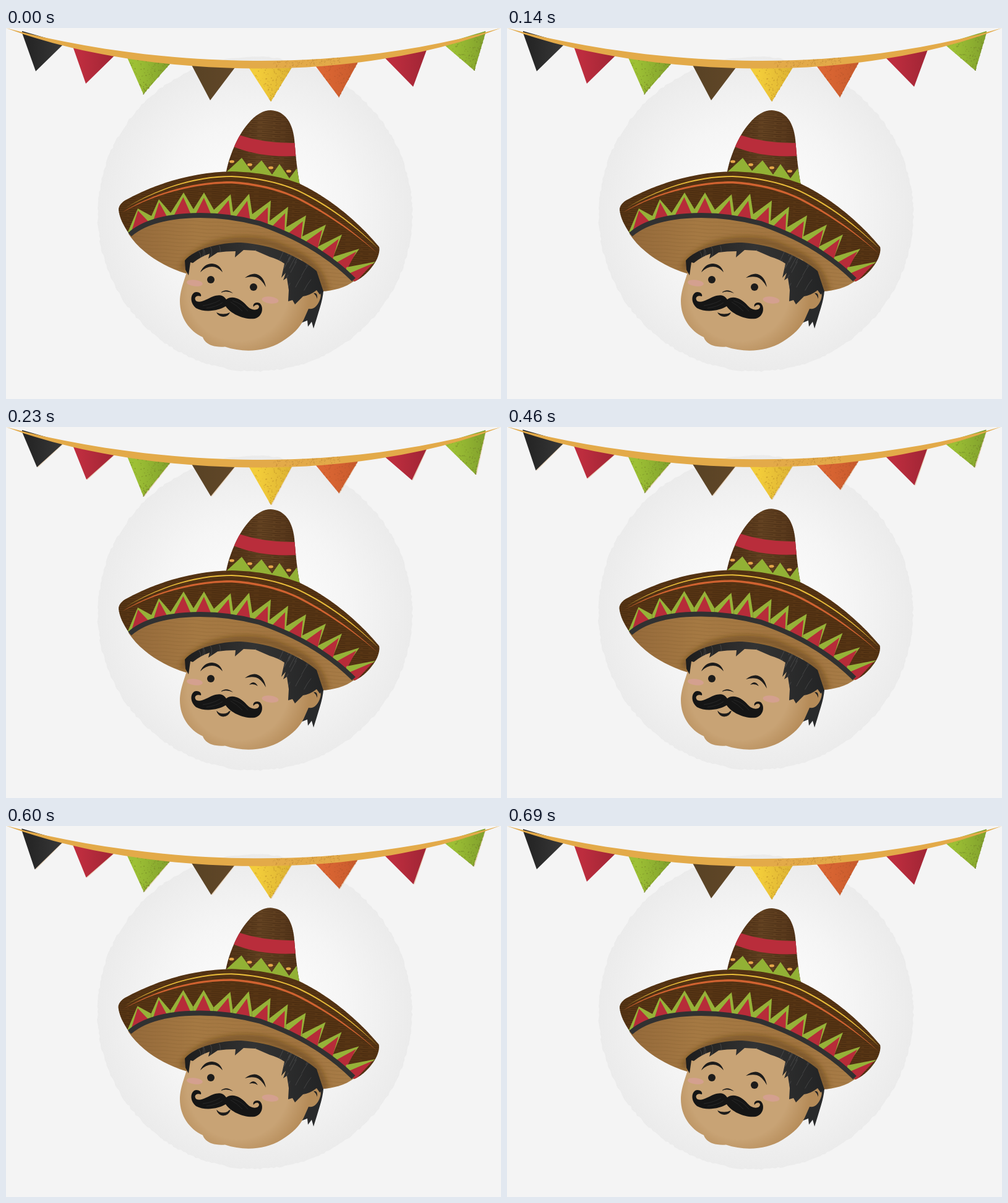
Recreate the animation shown at these times as an HTML page. Size 800 px wide and 600 px high, loop 920 ms.

```html
<!DOCTYPE html>
<html lang="en">
<head>
<meta charset="utf-8">
<title>Sombrero wink</title>
<style>
html, body { margin: 0; width: 100%; height: 100%; overflow: hidden; background: #f4f4f4; }
svg { display: block; width: 800px; height: 600px; }
</style>
</head>
<body>
<svg viewBox="0 0 800 600">
<defs>
  <radialGradient id="glow"><stop offset=".1" stop-color="#fdfdfd"/><stop offset=".6" stop-color="#f5f5f5"/><stop offset="1" stop-color="#ebebeb"/></radialGradient>
  <radialGradient id="skin" gradientUnits="userSpaceOnUse" cx="375" cy="425" r="116"><stop offset=".7" stop-color="#c8a375"/><stop offset="1" stop-color="#b58b58"/></radialGradient>
  <linearGradient id="under"><stop offset="0" stop-color="#94693a"/><stop offset=".3" stop-color="#a57943"/><stop offset=".75" stop-color="#a27540"/><stop offset="1" stop-color="#a87d48"/></linearGradient>
  <linearGradient id="crown"><stop offset="0" stop-color="#4f3015"/><stop offset=".5" stop-color="#644322"/><stop offset="1" stop-color="#523318"/></linearGradient>
  <linearGradient id="hair"><stop offset="0" stop-color="#1d1d1d"/><stop offset=".5" stop-color="#333"/><stop offset="1" stop-color="#232425"/></linearGradient>
  <pattern id="weave" width="38" height="7" patternUnits="userSpaceOnUse" patternTransform="rotate(3)">
    <path d="M0 2Q10 1 19 2T38 2M4 5H21M25 5.500H34" fill="none" stroke="#311b08" stroke-opacity=".45" stroke-width="1.200"/>
  </pattern>
  <pattern id="straw" width="44" height="6" patternUnits="userSpaceOnUse" patternTransform="rotate(3)">
    <path d="M0 2Q11 1 22 2T44 2" fill="none" stroke="#7b5528" stroke-opacity=".28"/>
  </pattern>
  <filter id="soft" x="-30%" y="-30%" width="160%" height="160%"><feGaussianBlur stdDeviation="5"/></filter>
  <path id="underShape" d="M198 333C240 299 330 295 410 316C480 340 530 375 563 409C548 420 530 425 509 426L400 440L291 397C252 385 217 362 198 333Z"/>
  <path id="brim" d="M182 294C182 288 186 283 192 279C250 247 310 233 365 232C405 233 445 240 475 252C523 275 570 314 603 354C605 362 600 375 594 383C585 396 573 406 563 410C530 375 480 340 410 316C330 295 240 299 199 333C190 320 183 306 182 294Z"/>
  <path id="crownShape" d="M356 232C361 208 373 176 391 155C403 140 416 133 428 133C450 134 463 152 466 180C468 203 470 228 475 254L430 262L356 245Z"/>
  <clipPath id="inUnder"><use href="#underShape"/></clipPath>
  <clipPath id="inCrown"><use href="#crownShape"/></clipPath>
  <clipPath id="inBrim"><use href="#brim"/></clipPath>
  <clipPath id="inHair"><use href="#hairShape"/></clipPath>
</defs>

<rect width="800" height="600" fill="#f4f4f4"/>
<polygon id="disc" fill="url(#glow)"/>
<g id="bunting"></g>

<g id="hat">
  <use href="#crownShape" fill="url(#crown)"/>
  <use href="#crownShape" fill="url(#weave)"/>
  <g clip-path="url(#inCrown)">
    <path d="M376 173Q420 187 468 186L469 207Q412 210 368 192Z" fill="#b92d3b"/>
    <path d="M356 233L381 210L396 231L413 214L430 237L442 220L458 243L470 227L476 256L356 250Z" fill="#92b135"/>
    <g fill="#e5a748"><ellipse cx="365" cy="216" rx="4" ry="2.300"/><ellipse cx="394" cy="221" rx="4" ry="2.300"/><ellipse cx="428" cy="226" rx="4" ry="2.300"/><ellipse cx="457" cy="231.500" rx="4" ry="2.300"/></g>
  </g>
  <use href="#underShape" fill="url(#under)"/>
  <use href="#underShape" fill="url(#straw)"/>
  <path clip-path="url(#inUnder)" d="M286 390C312 340 405 332 450 358C485 372 510 388 516 430" fill="none" stroke="#5a3b1a" stroke-opacity=".6" stroke-width="10" filter="url(#soft)"/>
  <use href="#brim" fill="#573514"/>
  <use href="#brim" fill="url(#weave)"/>
  <path fill="#e9bd3a" d="M193 291C250 256 310 239 365 239C405 241 442 249 472 262C521 285 567 320 602 357C565 321 520 287 471.500 264C442 251 405 243 365 241C310 241 250 258 193 291Z"/>
  <path fill="#d06230" d="M188 298C245 263 310 248 365 248C405 250 442 260 470 273C517 296 566 331 601 365C565 333 516 299 469 276C441 263 405 254 365 251.500C310 251 245 266 188 298Z"/>
  <g id="teeth" clip-path="url(#inBrim)"></g>
  <path d="M200 334C240 299 330 295 410 316C480 340 530 375 562 407" fill="none" stroke="#313131" stroke-width="8"/>
</g>

<path d="M513 425C512 438 508 450 505 460L502 470L497 486L494 475L488 483L487 473L477 477L489 448Z" fill="#292a2b"/>
<path d="M298 372C292 402 281 420 281 442C281 468 296 490 318 500C321 509 331 517 354 515.500C385 526 421 523 446 507C464 496 475 484 481 472L489 454C498 456 505 448 508 437C510 430 508 424 500 423L478 375Q380 330 298 372Z" fill="url(#skin)"/>
<path id="hairShape" d="M289 376C305 357 345 347 380 347C430 350 475 370 502 393L513 426L507 431L502 424Q492 432 480 434L467 447L463 440L456 442L457 424L454 404L448 408L452 396L445 404L450 381Q440 374 426 370L403 360L384 359L370 371L371 361Q355 361 342 363L327 373L329 365Q314 370 302 380L298 379L295 400L290 391Z" fill="url(#hair)"/>
<g id="strands" clip-path="url(#inHair)" fill="none" stroke="#777" stroke-opacity=".35"></g>
<path d="M497 429Q504 427 503 438Q501 432 497 429Z" fill="#252525"/>

<g fill="#d4a08f"><ellipse cx="305" cy="412.500" rx="13" ry="5" transform="rotate(7 305 412)"/><ellipse cx="427" cy="440" rx="13.500" ry="5.500" transform="rotate(7 427 440)"/></g>
<g fill="#1d1c1b">
  <path d="M314 395Q320 381 333 381Q346 382 350 395Q342 386 333 386Q323 386 314 395Z"/>
  <path id="brow" d="M386 404Q397 396 405 398Q417 402 420 419Q412 405 404 403Q396 401 386 404Z"/>
  <circle cx="331" cy="407" r="6"/>
  <path d="M347 428Q356 420 367 429Q356 424 347 428Z"/>
  <path id="eye"/>
  <path id="mouth"/>
</g>
<path fill="#151515" d="M356 439C351 431 343 431 335 434C325 438 316 445 308 442C303 438 306 431 315 434C317 429 309 425 304 428C297 433 298 446 307 453C322 461 344 457 355 450C364 463 385 472 402 470C415 467 417 451 410 445C404 442 398 446 400 451C404 446 409 447 409 451C408 457 397 458 389 449C379 437 365 432 356 439Z"/>
<path d="M318 449Q334 447 346 440M324 453Q340 451 350 444M363 443Q374 449 382 458M366 441Q382 446 391 458" fill="none" stroke="#4a4a4a" stroke-opacity=".45" stroke-width=".8"/>
</svg>

<script>
const $ = id => document.getElementById(id);

let seed;
const rnd = () => (seed = (seed * 16807) % 2147483647) / 2147483647;

// slightly ragged disc
seed = 7;
$('disc').setAttribute('points', Array.from({ length: 360 }, (_, i) => {
  const a = i * Math.PI / 180, r = 253 + rnd() * 2.5;
  return (402.5 + r * Math.cos(a)).toFixed(1) + ',' + (301 + r * Math.sin(a)).toFixed(1);
}).join(' '));

// zigzag trim
const peaks = [[213, 292], [247, 277], [287, 266], [320, 266], [363, 269], [393, 268], [428, 279],
  [456, 289], [485, 303], [517, 318], [543, 334], [571, 357], [597, 378]];
const dips = [[197, 330], [235, 304], [266, 299], [303, 293], [336, 294], [367, 298], [398, 301],
  [426, 312], [453, 322], [479, 337], [505, 353], [529, 370], [550, 387], [566, 402]];
let trim = '';
peaks.forEach((p, i) => {
  const a = dips[i], b = dips[i + 1], k = .1 + .2 * Math.sin(Math.PI * i / 12);
  const tip = [0, 1].map(j => p[j] * (1 - k) + ((a[j] + b[j]) / 2 + 8 * j) * k);
  trim += `<path fill="#96b238" d="M${a}L${p}L${b}v18L${a[0]} ${a[1] + 18}Z"/>`
    + `<path fill="#b72c39" d="M${a[0] + 2} ${a[1] + 11}L${tip}L${b[0] - 3} ${b[1] + 11}Z"/>`;
});
$('teeth').innerHTML = trim;

let strands = '';
for (let i = 0; i < 46; i++) {
  const x = 305 + rnd() * 200, y = 350 + rnd() * 65, lean = (400 - x) * .07;
  strands += `M${x} ${y}q${lean} 8 ${lean - 5} 18`;
}
$('strands').innerHTML = `<path d="${strands}"/>`;

// left corner, right corner, light colour, dark colour, speck colour
const flags = [
  [26, 8, 92, 27, '#262626', '#383838'],
  [108, 30, 176, 44, '#bd2d3e', '#a02535'],
  [196, 48, 266, 57, '#9dc035', '#80a02c', '#727e24'],
  [300, 60, 370, 64, '#5a4325', '#614728'],
  [393, 65, 462, 64, '#f3cd3a', '#dcb233', '#c2932c'],
  [500, 61, 569, 55, '#db6633', '#c85b2d', '#b5562b'],
  [612, 48, 680, 35, '#bd2d3e', '#a02535'],
  [709, 28, 775, 8, '#9dc035', '#80a02c', '#75862a']
];
const tips = [
  [[48, 70], [129, 90], [222, 107], [330, 117], [428, 119], [538, 112], [658, 95], [757, 69]],
  [[50, 65], [130, 85], [222, 112], [331, 112], [428, 126], [538, 107], [656, 86], [759, 77]],
  [[47, 71], [130, 84], [223, 107], [332, 112], [428, 118], [539, 102], [659, 95], [756, 66]]
];

const dot = (x, y, c) => `<circle cx="${x.toFixed(1)}" cy="${y.toFixed(1)}" r="${(.4 + rnd() * .7).toFixed(1)}" fill="${c}" opacity=".6"/>`;

function bunting(pose) {
  seed = 99;
  let out = '';
  flags.forEach(([x1, y1, x2, y2, light, dark, speck], i) => {
    const [tx, ty] = tips[pose][i];
    out += `<linearGradient id="flag${i}"><stop offset=".2" stop-color="${light}"/><stop offset="1" stop-color="${dark}"/></linearGradient>`;
    if (pose) out += `<path d="M${x2} ${y2}L${tx + 1} ${ty}" stroke="#e3bd92" stroke-opacity=".6" stroke-width="1.5"/>`;
    out += `<path d="M${x1} ${y1 - 3}L${x2} ${y2 - 3}V${y2}L${tx} ${ty}L${x1} ${y1}Z" fill="url(#flag${i})"/>`;
    for (let n = speck ? 110 : 0; n--;) {
      const down = rnd() ** 1.5, side = 1 - rnd() ** 1.7;
      const lx = x1 + (tx - x1) * down, ly = y1 + (ty - y1) * down;
      const rx = x2 + (tx - x2) * down, ry = y2 + (ty - y2) * down;
      out += dot(lx + (rx - lx) * side, ly + (ry - ly) * side, speck);
    }
  });
  out += '<path fill="#e3aa49" d="M0 0C130 35 270 52 400 53C530 54 670 38 800 0C680 47 530 67 400 65.500C270 65 120 45 0 0Z"/>';
  for (let n = 110; n--;) {
    const x = 430 + rnd() * 110, u = (x - 400) / 400;
    out += dot(x, 54 + rnd() * 10 - 50 * u * u, '#c28b39');
  }
  return out;
}

const eyes = ['M394 419a6 6 0 1 0 12 0a6 6 0 1 0 -12 0Z', 'M393 417Q401 408 407 419Q400 414 393 417Z'];
const mouths = ['M340 460Q351 465 362 460Q359 467 351 467Q343 466 340 460Z',
  'M340 459Q342 460 344 462Q351 465 358 462Q360 459 363 459Q360 468 351 468.500Q343 468 340 459Z'];
const banners = [0, 1, 2].map(bunting);
const order = [0, 1, 2, 0];
let shown = -1;

function draw(now) {
  const pose = order[Math.floor(now % 920 / 230)];
  if (pose !== shown) {
    shown = pose;
    const wink = pose ? 1 : 0;
    $('bunting').innerHTML = banners[pose];
    $('eye').setAttribute('d', eyes[wink]);
    $('mouth').setAttribute('d', mouths[wink]);
    $('brow').setAttribute('transform', `translate(0 ${pose * 2})`);
    const shift = pose === 2 ? 'translate(-.5 -.7)' : '';
    for (const id of ['disc', 'bunting', 'hat']) $(id).setAttribute('transform', shift);
  }
  requestAnimationFrame(draw);
}
draw(performance.now());
</script>
</body>
</html>
```
